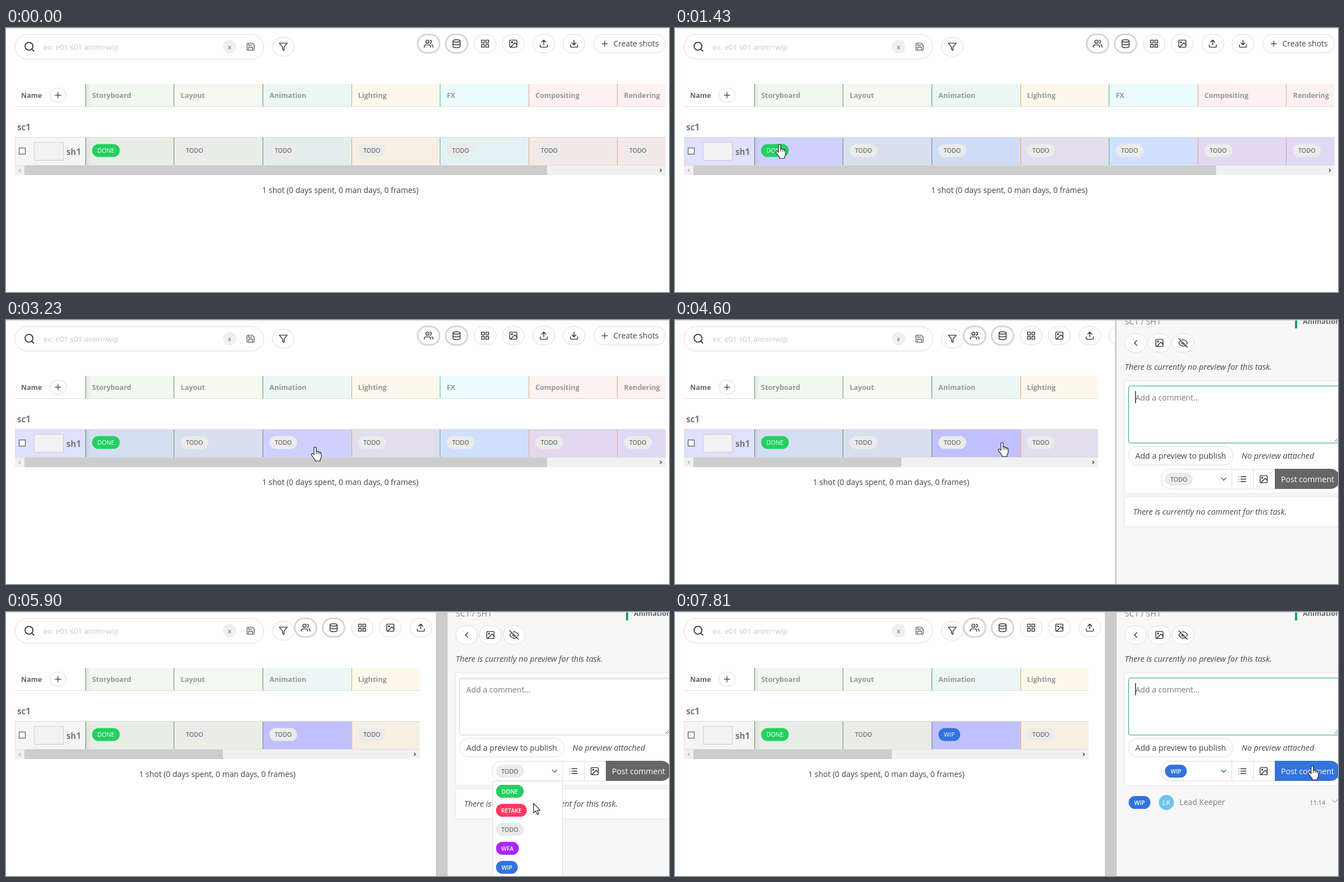
Recreate the animation shown at these times as an HTML page. Size 1186x472 px, loop 8000 ms.

```html
<!DOCTYPE html>
<html lang="en">
<head>
<meta charset="utf-8">
<title>Shot list</title>
<style>
  html, body { margin: 0; width: 100%; height: 100%; overflow: hidden; background: #fefefe; }
  svg { display: block; width: 100vw; height: 100vh; font-family: "Open Sans", "Noto Sans", sans-serif; }
  .card { fill: #fefefe; filter: drop-shadow(0 0 2px #ddd); }
  .line { fill: none; stroke-linecap: round; stroke-linejoin: round; }
</style>
</head>
<body>
<svg id="stage" viewBox="0 0 1186 472"></svg>
<script>
const LOOP = 8000;
const COL_X = 142, COL_W = 158.6;

// name, left border, header, row, hovered row
const COLS = [
  ['Storyboard', '#6b8573', '#f0f8f0', '#e7eee6', '#d3dff0'],
  ['Layout', '#75876c', '#f6f9f0', '#ebeee6', '#d8dfef'],
  ['Animation', '#5f8580', '#ebf7f4', '#e3eeec', '#cfdcf6'],
  ['Lighting', '#e89d5c', '#fff8ed', '#f7efe4', '#e3deee'],
  ['FX', '#3fc38a', '#ecfbfd', '#e4f2f4', '#d0e0fc'],
  ['Compositing', '#e2a283', '#fef1f1', '#f5e8e8', '#e2d8f0'],
  ['Rendering', '#e2a594', '#fef1f1', '#f5e8e8', '#e0d9f5']
];

const STATUS = {
  TODO: [49.5, '#ebebeb', '#4a4a4a'],
  DONE: [49.5, '#22d160', '#fff'],
  RETAKE: [55, '#ff3860', '#fff'],
  WFA: [41, '#ab26ff', '#fff'],
  WIP: [39, '#3273dc', '#fff']
};

const ICONS = {
  users: '<path d="M17 21v-2a4 4 0 0 0-4-4H5a4 4 0 0 0-4 4v2M23 21v-2a4 4 0 0 0-3-3.9M16 3.1a4 4 0 0 1 0 7.8"/><circle cx="9" cy="7" r="4"/>',
  data: '<ellipse cx="12" cy="5" rx="9" ry="3"/><path d="M21 12c0 1.7-4 3-9 3s-9-1.300-9-3M3 5v14c0 1.700 4 3 9 3s9-1.300 9-3V5"/>',
  grid: '<path d="M3 3h7v7H3zM14 3h7v7h-7zM14 14h7v7h-7zM3 14h7v7H3z"/>',
  image: '<rect x="3" y="3" width="18" height="18" rx="2"/><circle cx="8.500" cy="8.500" r="1.500"/><path d="M21 15l-5-5L5 21"/>',
  upload: '<path d="M21 15v4a2 2 0 0 1-2 2H5a2 2 0 0 1-2-2v-4M17 8l-5-5-5 5M12 3v12"/>',
  download: '<path d="M21 15v4a2 2 0 0 1-2 2H5a2 2 0 0 1-2-2v-4M7 10l5 5 5-5M12 15V3"/>',
  plus: '<path d="M12 4v16M4 12h16"/>',
  filter: '<path d="M22 3H2l8 9.500V19l4 2v-8.500z"/>',
  search: '<circle cx="11" cy="11" r="8"/><path d="M21 21l-4.300-4.300"/>',
  save: '<path d="M19 21H5a2 2 0 0 1-2-2V5a2 2 0 0 1 2-2h11l5 5v11a2 2 0 0 1-2 2zM17 21v-8H7v8M7 3v5h8"/>',
  back: '<path d="M15 18l-6-6 6-6"/>',
  down: '<path d="M6 9l6 6 6-6"/>',
  list: '<path d="M8 6h13M8 12h13M8 18h13M3 6h.01M3 12h.01M3 18h.01"/>',
  hide: '<path d="M18 18A10 10 0 0 1 12 20C5 20 1 12 1 12a18 18 0 0 1 5-6M10 4.200A9 9 0 0 1 12 4c7 0 11 8 11 8a18 18 0 0 1-2.200 3.200M14 14a3 3 0 1 1-4.200-4.200M1 1l22 22"/>'
};

const text = (x, y, str, size, fill, more = '') =>
  `<text x="${x}" y="${y}" font-size="${size}" fill="${fill}" ${more}>${str}</text>`;
const rect = (x, y, w, h, fill, more = '') =>
  `<rect x="${x}" y="${y}" width="${w}" height="${h}" fill="${fill}" ${more}/>`;
const icon = (name, x, y, size = 17, color = '#333', width = 2) =>
  `<g class="line" stroke="${color}" stroke-width="${width}" transform="translate(${x - size / 2} ${y - size / 2}) scale(${size / 24})">${ICONS[name]}</g>`;
const button = (name, x, y, ring) =>
  rect(x - 19.5, y - 16.5, 39, 33, '#fefefe', `rx="16.5" stroke="${ring ? '#d6d6d6' : '#dcdcdc'}" stroke-width="${ring ? 3 : 1}"`) +
  icon(name, x, y);
const group = (id, body, more = '') => `<g id="${id}" ${more}>${body}</g>`;

function pill(name, x, y, weight = 400) {
  const [w, fill, ink] = STATUS[name];
  return rect(x, y - 11.5, w, 23, fill, 'rx="11.5"') +
    text(x + w / 2, y + 4, name, weight > 400 ? 10.3 : 10.8, ink, `text-anchor="middle" font-weight="${weight}"`);
}

function tools() {
  const names = ['users', 'data', 'grid', 'image', 'upload', 'download'];
  const xs = [756, 806, 857, 907.5, 962, 1016];
  return names.map((n, i) => button(n, xs[i], 28, i < 2)).join('') +
    rect(1051.5, 11.5, 128, 33, '#fefefe', 'rx="16.5" stroke="#dcdcdc"') +
    icon('plus', 1071, 28, 15) + text(1086.5, 33, 'Create shots', 13.9, '#444');
}

function table() {
  const bold = 'font-weight="700"';
  let out = rect(16, 195, 126, 50, '#f5f5f5', 'id="nameCell"');
  COLS.forEach(([name, edge, head, row], i) => {
    const x = COL_X + i * COL_W;
    out += rect(x, 100, COL_W, 40, head) + rect(x, 195, COL_W, 50, row, `id="cell${i}"`);
    if (!i) out += rect(x, 100, 10, 40, 'url(#shade)') + rect(x, 195, 10, 50, 'url(#shade)');
    const line = Math.round(x - 0.3);
    out += rect(line, 100, 1, 40, edge) + rect(line, 195, 1, 50, edge);
    out += text(x + 12, 125, name, 12.6, '#949896', bold);
    const px = x + 12;
    out += i === 2
      ? group('cellTodo', pill('TODO', px, 219)) + group('cellWip', pill('WIP', px, 219))
      : pill(i ? 'TODO' : 'DONE', px, 219);
  });
  return out + rect(16, 140, 1164, 1, '#dcdcdc') + rect(16, 195, 1164, 1, '#d9d9d9') +
    rect(16, 195, 1, 50, '#dcdcdc') + rect(16, 245, 1164, 1, '#dcdcdc') + rect(16, 246, 1164, 17, '#f1f1f1') +
    rect(33, 246, 935, 17, '#cdcdcd', 'id="thumb"') +
    icon('back', 24.5, 254.5, 9, '#a3a3a3', 3) +
    `<g id="arrowR"><g transform="rotate(180 0 254.5)">${icon('back', 0, 254.5, 9, '#444', 4)}</g></g>` +
    text(27, 125, 'Name', 12.5, '#666', bold) +
    rect(78.5, 107.500, 29, 25, '#fefefe', 'rx="12.5" stroke="#dcdcdc"') + icon('plus', 93, 120, 15) +
    rect(23.5, 214.500, 11, 11, '#fefefe', 'stroke="#555" stroke-width="1.2"') +
    rect(50.500, 204.500, 52, 32, '#f2f2f2', 'stroke="#ccc"') +
    text(108, 227, 'sh1', 15.1, '#777', bold);
}

function panel() {
  const it = 'font-style="italic"';
  const menu = rect(870.5, 302.500, 125, 180, '#fefefe', 'stroke="#dcdcdc"') +
    ['DONE', 'RETAKE', 'TODO', 'WFA', 'WIP'].map((s, i) =>
      pill(s, 876.5, 320.500 + i * 34, s === 'TODO' ? 400 : 600)).join('');
  return rect(787, 0, 3, 472, '#cccccc', 'id="bar"') + rect(790, 0, 396, 472, '#f7f7f7') +
    text(804.5, 8, 'SC1 / SH1', 14.4, '#808080') +
    rect(1109, 0, 4, 15, '#0fa564') + text(1123, 7, 'Animation', 12.7, '#666', 'font-weight="700"') +
    button('back', 824, 41) + button('image', 866.5, 41) + button('hide', 909, 41) +
    text(804.5, 89, 'There is currently no preview for this task.', 14.43, '#4a4a4a', it) +
    '<rect class="card" x="805" y="109.500" width="400" height="200" rx="3"/>' +
    rect(811.5, 118, 390, 102, '#fefefe', 'id="area" rx="3"') +
    rect(813, 119, 380, 2, '#ededed', 'id="inset"') +
    text(823.5, 144, 'Add a comment...', 14, '#7b7b7b') + rect(823, 127, 1.5, 22, '#333', 'id="caret"') +
    '<path class="line" stroke="#666" d="M1179.500 217.500l6-6M1183.500 217.500l3-3"/>' +
    rect(811.5, 226, 187, 33, '#fefefe', 'rx="16.500" stroke="#dcdcdc"') +
    text(823.5, 247.5, 'Add a preview to publish', 14.15, '#444') +
    text(1013.5, 247.5, 'No preview attached', 14.45, '#4a4a4a', it) +
    '<path d="M1073 267H887a17.500 17.500 0 0 0 0 35H1073M996 267v35M1034.500 267v35" fill="#fefefe" stroke="#dcdcdc"/>' +
    group('pickTodo', pill('TODO', 876.5, 284.5)) + group('pickWip', pill('WIP', 876.5, 284.5, 600)) +
    icon('down', 981.5, 284.5, 16, '#22804a', 2.2) + icon('list', 1015, 284.5) + icon('image', 1053, 284.5) +
    '<path id="post" d="M1073 266h99a18 18 0 0 1 0 36h-99z"/>' +
    text(1084, 289.5, 'Post comment', 14.05, '#fff') +
    group('empty', '<rect class="card" x="805" y="317" width="400" height="52" rx="3"/>' +
      text(819.5, 348, 'There is currently no comment for this task.', 14.43, '#4a4a4a', it)) +
    group('entry', pill('WIP', 811.5, 340.500, 600) +
      '<circle cx="879" cy="340.500" r="13.500" fill="#6fc3f0"/>' +
      text(879, 345, 'LK', 12.5, '#fff', 'text-anchor="middle"') +
      text(902.5, 345, 'Lead Keeper', 14, '#7b7b7b') +
      text(1135.5, 344.5, '11:14', 10.8, '#666') + icon('down', 1180, 338, 18, '#aaa', 1.6)) +
    group('menu', menu);
}

const outline = 'fill="#fff" stroke="#222" stroke-width="1.2" stroke-linejoin="round"';
const stage = document.getElementById('stage');
stage.innerHTML =
  `<defs><clipPath id="clip"><rect id="clipBox" x="16" y="90" width="1164" height="180"/></clipPath>
   <linearGradient id="shade"><stop stop-color="#405040" stop-opacity=".1"/><stop offset="1" stop-color="#405040" stop-opacity="0"/></linearGradient></defs>` +
  rect(0, 0, 1186, 472, '#fefefe') +
  rect(16, 11.500, 445, 44, '#fefefe', 'rx="22" stroke="#dcdcdc"') +
  icon('search', 42, 33.5, 21) + text(67, 38.5, 'ex: e01 s01 anim=wip', 13.45, '#c9c9c9') +
  '<circle cx="400" cy="33.500" r="12" fill="#f0f0f0"/>' +
  text(400, 37.5, 'x', 11, '#555', 'text-anchor="middle"') + icon('save', 437.500, 33.5, 17, '#666') +
  button('filter', 496, 33.5) + group('tools', tools()) +
  text(20, 182.5, 'sc1', 15.2, '#777', 'font-weight="700"') +
  group('table', table(), 'clip-path="url(#clip)"') +
  text(598, 294.5, '1 shot (0 days spent, 0 man days, 0 frames)', 13.97, '#444', 'id="total" text-anchor="middle"') +
  group('panel', panel()) + rect(0, 0, 1186, 1, '#cfcfcf') +
  group('cursor',
    `<path id="arrow" ${outline} d="M0 0V17L4 13.500L6.800 20L9.500 18.800L6.800 12.500H12Z"/>` +
    `<g id="hand"><path ${outline} d="M-2 2Q-2 0 0 0T2 2V8Q4 7 5.200 8.700Q7.500 8 8.400 10Q11 9.500 11 12V17Q11 20 9 22V25H0V23Q-3 19 -6 15Q-7.500 12.500 -5.500 11.700Q-4 11.500 -2 14Z"/>
     <path class="line" stroke="#222" d="M2 8v4.500M5.200 8.700v4M8.400 10v3"/></g>`);

const el = {};
stage.querySelectorAll('[id]').forEach(node => { el[node.id] = node; });
const set = (id, name, value) => el[id].setAttribute(name, value);
const show = (id, on) => set(id, 'visibility', on ? 'visible' : 'hidden');

// start, end and number of steps of each burst of movement
const BURSTS = [
  [390, 1150, 12], [1220, 1980, 12], [2040, 2800, 12], [2870, 3080, 4], [3230, 3990, 11],
  [4060, 4260, 4], [4600, 5210, 10], [5560, 6300, 11], [6490, 6980, 8], [7180, 7810, 10]
];

// time, x, y of the pointer tip
const PATH = [
  [390, 1076, 450], [1150, 178, 268], [1220, 184, 236], [1427, 187, 208], [1500, 190, 210],
  [1980, 484, 200], [2400, 472, 220], [2800, 496, 227], [3080, 553, 227], [3230, 553, 227],
  [3600, 462, 209], [3990, 545, 214], [4260, 585, 219], [4600, 585, 219], [5070, 964, 282],
  [5560, 964, 282], [6300, 906, 453], [6490, 906, 453], [6560, 910, 452], [6980, 1140, 275]
];

function step(t) {
  const burst = BURSTS.filter(b => b[0] <= t).pop();
  if (!burst) return 0;
  const [a, b, n] = burst, d = (b - a) / (n - 1);
  return Math.min(b, a + Math.floor((t - a) / d + 0.01) * d);
}

function pointer(t) {
  const i = PATH.findIndex(p => p[0] > t);
  if (i < 0) return PATH[PATH.length - 1].slice(1);
  if (!i) return PATH[0].slice(1);
  const [t0, x0, y0] = PATH[i - 1], [t1, x1, y1] = PATH[i];
  const u = (t - t0) / (t1 - t0), k = u * u * (3 - 2 * u);
  return [x0 + (x1 - x0) * k, y0 + (y1 - y0) * k];
}

function render(time) {
  const t = step(time);
  const [x, y] = pointer(t);
  const open = t >= 4120, wide = t >= 4800;
  const menu = t >= 5130 && t < 6490, picked = t >= 6490, posted = t >= 7240;
  const focus = posted || (open && t < 5130);
  const right = wide ? 740 : open ? 757 : 1180;
  const over = t >= 390 && y >= 195 && y < 246 && x < right;
  const hot = over ? Math.floor((x - COL_X) / COL_W) : -1;

  set('tools', 'transform', `translate(${open ? -220 : 0} 0)`);
  set('clipBox', 'width', right - 16);
  set('thumb', 'width', wide ? 355 : open ? 372 : 935);
  set('arrowR', 'transform', `translate(${right - 8.5} 0)`);
  set('total', 'x', (16 + right) / 2);
  set('nameCell', 'fill', over ? '#e0e0ff' : '#f5f5f5');
  COLS.forEach((c, i) => set('cell' + i, 'fill',
    open && i === 2 ? '#c0c0ff' : i === hot ? '#d0d0ff' : c[over ? 4 : 3]));

  // children inherit visibility, so the panel itself uses display
  set('panel', 'display', open ? 'inline' : 'none');
  set('bar', 'x', wide ? 769 : 787);
  set('bar', 'width', wide ? 21 : 3);
  set('area', 'stroke', focus ? '#16a860' : '#d2d2d2');
  show('inset', !focus);
  show('caret', focus);
  show('menu', menu);
  show('pickTodo', !picked);
  show('pickWip', picked);
  show('cellTodo', !posted);
  show('cellWip', posted);
  show('empty', !posted);
  show('entry', posted);
  set('post', 'fill', picked ? '#3273dc' : '#666');

  const hand = over || (open && x > 1073 && y > 266 && y < 302);
  set('cursor', 'display', t >= 390 ? 'inline' : 'none');
  set('cursor', 'transform', `translate(${x.toFixed(1)} ${y.toFixed(1)})`);
  show('hand', hand);
  show('arrow', !hand);
}

const start = performance.now();
function frame() {
  render((performance.now() - start) % LOOP);
  requestAnimationFrame(frame);
}
frame();
</script>
</body>
</html>
```
